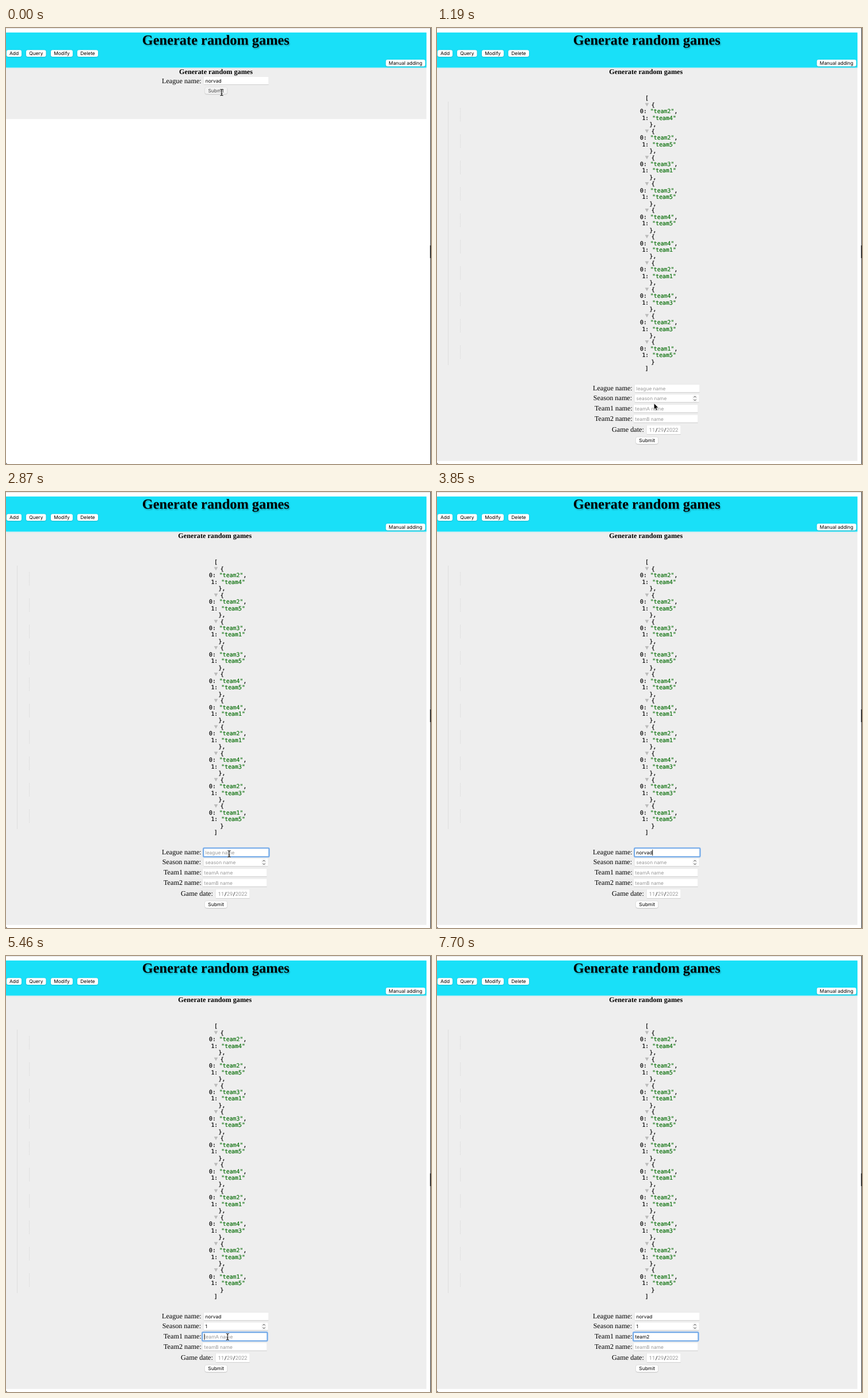
Write an HTML page with a canvas that moves like this. It is 739 px wide and 758 px high and loops after 8000 ms.

```html
<!DOCTYPE html>
<html lang="en">
<head>
<meta charset="utf-8">
<title>Generate random games</title>
<style>
html, body { margin: 0; width: 100%; height: 100%; overflow: hidden; background: #fff; }
canvas { display: block; }
</style>
</head>
<body>
<canvas id="stage" width="739" height="758"></canvas>
<script>
const ctx = document.getElementById('stage').getContext('2d');
ctx.textRendering = 'geometricPrecision';

const LOOP = 8000, TICK = 70;
const SERIF = '12.2px "Liberation Serif", serif';
const BOLD = 'bold 12.2px "Liberation Serif", serif';
const TITLE = 'bold 24.4px "Liberation Serif", serif';
const UI = '8.4px Inter, sans-serif';
const DIGITS = '9.3px Roboto, sans-serif';
const MONO = '9.9px "DejaVu Sans Mono", monospace';
const LEAGUE = 'norvad';
const GAMES = ['24', '25', '31', '35', '45', '41', '21', '43', '23', '15'];
const ROW = 11.46;

// Each field: label, geometry, focus span and the moments its letters arrive.
const FIELDS = [
  { label: 'League name:', labelX: 271, x: 344, y: 619.7, w: 112.5, hint: 'league name',
    value: LEAGUE, focus: 2310, blur: 4060, keys: [3290, 3360, 3430, 3500, 3640, 3710] },
  { label: 'Season name:', labelX: 271.8, x: 344, y: 636.9, w: 111.5, hint: 'season name',
    value: '1', focus: 4060, blur: 5040, keys: [4620], stepper: true },
  { label: 'Team1 name:', labelX: 274, x: 342, y: 654.8, w: 111.5, hint: 'teamA name',
    value: 'team2', focus: 5040, blur: LOOP, keys: [5950, 6160, 6370, 6650, 7140] },
  { label: 'Team2 name:', labelX: 274, x: 342, y: 672.2, w: 111.5, hint: 'teamB name',
    value: '', focus: LOOP, blur: LOOP, keys: [] }
];

// Pointer waypoints: time, x, y
const PATH = [
  [350, 375, 112], [560, 364, 205], [770, 358, 390], [980, 368, 570], [1190, 377.3, 652.5],
  [1400, 395, 641], [1610, 391, 624], [1750, 387.5, 634.5], [1960, 388, 633],
  [2100, 388, 633], [2240, 388, 629], [4620, 388, 629], [4690, 389, 640], [4830, 386, 660],
  [5250, 386, 660], [5460, 385.3, 662], [5670, 385, 662.5]
];

function text(str, x, y, font, color = '#000', align = 'left') {
  ctx.font = font;
  ctx.fillStyle = color;
  ctx.textAlign = align;
  ctx.fillText(str, x, y);
  return ctx.measureText(str).width;
}

// Monospaced text with a hairline outline for a slightly sturdier weight.
function code(str, x, y, color = '#000', align = 'left') {
  const width = text(str, x, y, MONO, color, align);
  ctx.strokeStyle = color;
  ctx.lineWidth = 0.2;
  ctx.strokeText(str, x, y);
  return width;
}

function rect(x, y, w, h, color) {
  ctx.fillStyle = color;
  ctx.fillRect(x, y, w, h);
}

function rounded(x, y, w, h, r) {
  ctx.beginPath();
  ctx.roundRect(x, y, w, h, r);
}

function poly(points, color) {
  ctx.beginPath();
  points.forEach(([x, y]) => ctx.lineTo(x, y));
  ctx.closePath();
  ctx.fillStyle = color;
  ctx.fill();
}

function withShadow(color, blur, dx, dy, draw) {
  ctx.save();
  ctx.shadowColor = color;
  ctx.shadowBlur = blur;
  ctx.shadowOffsetX = dx;
  ctx.shadowOffsetY = dy;
  draw();
  ctx.restore();
}

function button(label, x, y, w, face = '#fff', ink = '#000') {
  withShadow('rgba(0,0,0,.3)', 1.5, 0, 0.4, () => {
    rounded(x, y, w, 11.8, 3);
    ctx.fillStyle = face;
    ctx.fill();
  });
  text(label, x + w / 2, y + 9, UI, ink, 'center');
}

function inputBox(x, y, w, h = 14) {
  rect(x - 0.4, y, w + 0.8, h + 0.4, '#e2e2e2');
  rect(x, y + 0.3, w, h - 0.6, '#fff');
  rect(x, y + h - 0.4, w, 0.8, '#c9c9c9');
}

function header() {
  withShadow('rgba(24,224,248,.45)', 2.5, 0, 0.3, () => rect(0, 8, 731, 60.7, '#19e0f8'));
  withShadow('rgba(0,0,0,.28)', 2, 1.2, 1.2, () => text('Generate random games', 236.8, 29.3, TITLE));
  button('Add', 1, 38.2, 26);
  button('Query', 35, 38.2, 34.5);
  button('Modify', 78, 38.2, 38);
  button('Delete', 124, 38.2, 36);
  button('Manual adding', 660.5, 55, 68.5);
}

function windowEdge() {
  rect(0, 0, 739, 0.5, '#bbb');
  rect(737.8, 0, 1.2, 758, '#444');
  rect(737.5, 378, 1.5, 22, '#111');
  poly([[0, 755.5], [1, 757.2], [2.5, 758], [0, 758]], '#555');
}

function entryForm() {
  rect(0, 69, 731, 89.3, '#eee');
  text('Generate random games', 301, 80, BOLD);
  text('League name:', 271, 95.5, SERIF);
  inputBox(344, 84.5, 112.5);
  text(LEAGUE, 346.8, 95, UI);
  button('Submit', 346, 103, 38.5, '#f3f3f3', '#444');
}

function gameList() {
  const line = n => 125.4 + n * ROW;
  rect(19, 128, 1, 458, '#dedede');
  code('[', 365, line(0), '#000', 'center');
  GAMES.forEach((pair, i) => {
    const n = 1 + i * 4, top = line(n);
    for (let y = 0; y < 24; y += 2) rect(40.3, top + 2.5 + y, 0.8, 1, '#cfcfcf');
    poly([[361.7, top - 6.3], [368.3, top - 6.3], [365, top - 0.3]], '#bbb');
    code('{', 375.6, top, '#000', 'center');
    [...pair].forEach((team, k) => {
      let x = k ? 356.4 : 353;
      x += code(k + ': ', x, line(n + 1 + k));
      x += code(`"team${team}"`, x, line(n + 1 + k), '#0a6f0a');
      if (!k) code(',', x, line(n + 1));
    });
    code(i < GAMES.length - 1 ? '},' : '}', 375.5, line(n + 3), '#000', 'center');
  });
  code(']', 364.7, line(41), '#000', 'center');
}

function stepper(x, y) {
  rounded(x - 3.4, y - 5.2, 6.8, 10.4, 2.5);
  ctx.fillStyle = '#fff';
  ctx.fill();
  ctx.strokeStyle = '#ddd';
  ctx.lineWidth = 0.6;
  ctx.stroke();
  ctx.strokeStyle = '#222';
  ctx.lineWidth = 1;
  for (const s of [-1, 1]) {
    ctx.beginPath();
    ctx.moveTo(x - 2, y + s * 1.7);
    ctx.lineTo(x, y + s * 3.8);
    ctx.lineTo(x + 2, y + s * 1.7);
    ctx.stroke();
  }
}

function focusRing(f, age) {
  const grow = 2.5 * Math.max(0, 1 - age / 210);
  ctx.globalAlpha = 1 - grow / 4;
  rounded(f.x - 0.8 - grow, f.y - 0.7 - grow, f.w + 1.8 + 2 * grow, 15.2 + 2 * grow, 1.5);
  ctx.strokeStyle = '#a6c9f2';
  ctx.lineWidth = 2.6;
  ctx.stroke();
  ctx.strokeStyle = '#72a8e6';
  ctx.lineWidth = 1.6;
  ctx.stroke();
  ctx.globalAlpha = 1;
}

function field(f, t) {
  const pressed = f.keys.filter(k => k <= t);
  const typed = f.value.slice(0, pressed.length);
  const focused = t >= f.focus && t < f.blur;
  const x = f.x + 2.6, base = f.y + 10.5;
  text(f.label, f.labelX, f.y + 10.4, SERIF);
  inputBox(f.x, f.y, f.w);
  if (focused) focusRing(f, t - f.focus);
  const width = text(typed || f.hint, x, base, UI, typed ? '#000' : '#999');
  if (f.stepper) stepper(448.5, 644);
  const last = pressed.length ? pressed[pressed.length - 1] : f.focus;
  if (focused && (t - last) % 1120 < 560) {
    rect(x + (typed ? width : 0), f.y + 2, 0.9, 10.5, '#000');
  }
}

function gameForm(t) {
  FIELDS.forEach(f => field(f, t));
  text('Game date:', 304, 702.3, SERIF);
  inputBox(365, 690.5, 58.5, 16.2);
  text('11', 368.8, 702.2, DIGITS, '#999');
  text('/', 379.7, 702.2, DIGITS);
  text('29', 383.8, 702.2, DIGITS, '#999');
  text('/', 394.7, 702.2, DIGITS);
  text('2022', 398.7, 702.2, DIGITS, '#999');
  button('Submit', 346, 711.2, 38.3);
}

function pointerAt(t) {
  const i = PATH.findIndex(p => p[0] > t);
  if (i === 0) return PATH[0].slice(1);
  if (i < 0) return PATH[PATH.length - 1].slice(1);
  const [a, b] = [PATH[i - 1], PATH[i]];
  const u = (t - a[0]) / (b[0] - a[0]);
  return [1, 2].map(k => a[k] + (b[k] - a[k]) * u);
}

function beam(x, y) {
  const trace = () => {
    ctx.beginPath();
    for (const s of [-1, 1]) {
      ctx.moveTo(x - 2.6, y + s * 5.5);
      ctx.quadraticCurveTo(x, y + s * 5.5, x, y + s * 3.7);
      ctx.quadraticCurveTo(x, y + s * 5.5, x + 2.6, y + s * 5.5);
    }
    ctx.moveTo(x, y - 4);
    ctx.lineTo(x, y + 4);
    ctx.moveTo(x - 1.4, y + 2);
    ctx.lineTo(x + 1.4, y + 2);
  };
  for (const [color, width] of [['rgba(255,255,255,.7)', 2.2], ['#111', 1.1]]) {
    trace();
    ctx.strokeStyle = color;
    ctx.lineWidth = width;
    ctx.stroke();
  }
}

function arrow(x, y) {
  const shape = [[0, 0], [0, 10.6], [2.4, 8.4], [4.1, 12.2], [5.9, 11.4], [4.3, 7.7], [7.5, 7.5]];
  withShadow('rgba(0,0,0,.3)', 1.5, 0, 0.7, () => {
    poly(shape.map(([dx, dy]) => [x + dx, y + dy]), '#000');
  });
  ctx.strokeStyle = '#fff';
  ctx.lineWidth = 0.7;
  ctx.stroke();
}

function pointer(t) {
  const hidden = (t >= 3290 && t < 4690) || t >= 5950;
  if (hidden) return;
  const overText = t < 140 || t >= 1470;
  (overText ? beam : arrow)(...pointerAt(t));
}

function render(now) {
  const t = Math.floor((now % LOOP) / TICK) * TICK;
  rect(0, 0, 739, 758, '#fff');
  if (t < 70) {
    entryForm();
  } else {
    rect(0, 69, 731, 683.7, '#eee');
    text('Generate random games', 299.3, 80, BOLD);
    gameList();
    gameForm(t);
  }
  header();
  windowEdge();
  pointer(t);
}

const start = performance.now();
function loop() {
  render(performance.now() - start);
  requestAnimationFrame(loop);
}
loop();
</script>
</body>
</html>
```
